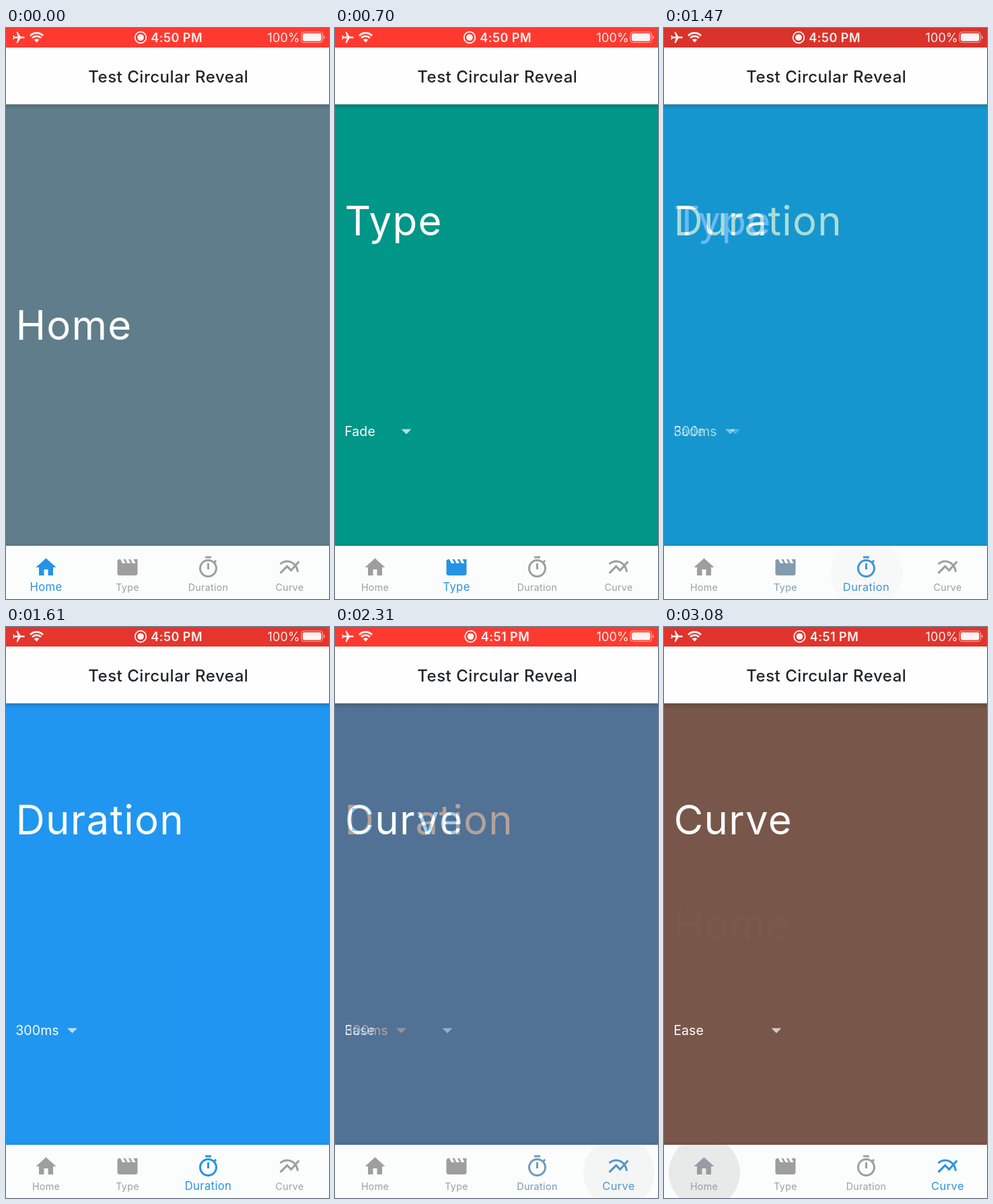
An HTML page for the animation above (3.15 s loop, 480 px wide and 848 px high).

```html
<!DOCTYPE html>
<html lang="en">
<head>
<meta charset="utf-8">
<title>Circular Reveal</title>
<style>
  html, body { margin: 0; width: 100%; height: 100%; overflow: hidden; }
  svg { display: block; width: 100vw; height: 100vh; }
  text { font-family: Inter, Roboto, sans-serif; white-space: pre; }
  .status { font-size: 18px; fill: #fff4f2; }
  .title { font-size: 24px; font-weight: 500; letter-spacing: .52px; fill: #212326; text-anchor: middle; }
  .big { font-size: 60px; letter-spacing: 1.25px; fill: #fff; }
  .value { font-size: 19.5px; letter-spacing: .1px; fill: #fff; }
  .label { font-size: 16.6px; letter-spacing: .38px; text-anchor: middle; }
</style>
</head>
<body>
<svg viewBox="0 0 480 848">
  <defs>
    <linearGradient id="down" x2="0" y2="1">
      <stop stop-opacity=".28"/><stop offset=".4" stop-opacity=".1"/><stop offset="1" stop-opacity="0"/>
    </linearGradient>
    <linearGradient id="up" y1="1" x2="0" y2="0">
      <stop stop-opacity=".06"/><stop offset="1" stop-opacity="0"/>
    </linearGradient>
    <clipPath id="barClip"><path d="M0 769H480V848H0z"/></clipPath>
  </defs>

  <g id="pages"></g>

  <rect y="113" width="480" height="8" fill="url(#down)"/>
  <rect y="28" width="480" height="85.4" fill="#fefefe"/>
  <text class="title" x="241.3" y="80.5">Test Circular Reveal</text>

  <rect id="status" width="480" height="29"/>
  <g fill="#fff4f2">
    <path transform="translate(19 14) rotate(90) scale(.88) translate(-11.5 -12)"
      d="M21 16v-2l-8-5V3.5c0-.83-.67-1.5-1.5-1.5S10 2.67 10 3.5V9l-8 5v2l8-2.5V19l-2 1.5V22l3.5-1 3.5 1v-1.5L13 19v-5.5l8 2.5z"/>
    <path d="M45.5 21.5l-3.8-3.9a5.4 5.4 0 0 1 7.6 0z"/>
    <path d="M39.1 14.8a9 9 0 0 1 12.8 0M36 11.4a13.4 13.4 0 0 1 19 0" fill="none" stroke="#fff4f2" stroke-width="2.8"/>
    <g id="record">
      <circle cx="200" cy="14" r="8.3" fill="none" stroke="#fff4f2" stroke-width="1.8"/>
      <circle cx="200" cy="14" r="4.8"/>
      <text id="clock" class="status" x="215.2" y="20.5" font-weight="600" letter-spacing=".5"></text>
    </g>
    <text class="status" x="388.5" y="20.5" letter-spacing=".15">100%</text>
    <rect x="439" y="6" width="31.5" height="15.5" rx="4" fill="none" stroke="#fff4f2" stroke-opacity=".6" stroke-width="1.2"/>
    <rect x="441" y="8" width="27.5" height="11.5" rx="2.4"/>
    <path d="M472 11.2q2 .6 2 2.6t-2 2.6z" opacity=".6"/>
  </g>

  <rect y="764" width="480" height="5" fill="url(#up)"/>
  <rect y="769" width="480" height="79" fill="#fbfcfc"/>
  <g id="bar" clip-path="url(#barClip)"><circle id="ripple" cy="810"/></g>
</svg>

<script>
const LOOP = 3150, STEP = 70, FADE = 300;
const $ = id => document.getElementById(id);

const tabs = [
  { name: 'Home', x: 59.5, color: '#607d8b', y: 463,
    icon: 'M10 20v-6h4v6h5v-8h3L12 3 2 12h3v8z' },
  { name: 'Type', x: 180.5, color: '#009688', y: 307.5, value: 'Fade', arrow: 106,
    icon: 'M18 4l2 4h-3l-2-4h-2l2 4h-3l-2-4H8l2 4H7L5 4H4c-1.1 0-2 .9-2 2v12c0 1.1.9 2 2 2h16c1.1 0 2-.9 2-2V4h-4z' },
  { name: 'Duration', x: 300.5, color: '#2196f3', y: 307.5, value: '300ms', arrow: 98.5,
    icon: 'M15 1H9v2h6V1zm-4 13h2V8h-2v6zm8.03-6.61l1.42-1.42c-.43-.51-.9-.99-1.41-1.41l-1.42 1.42C16.07 4.74 14.12 4 12 4c-4.97 0-9 4.03-9 9s4.02 9 9 9 9-4.03 9-9c0-2.12-.74-4.07-1.97-5.61zM12 20c-3.87 0-7-3.13-7-7s3.13-7 7-7 7 3.13 7 7-3.13 7-7 7z' },
  { name: 'Curve', x: 421.5, color: '#795548', y: 307.5, value: 'Ease', arrow: 167,
    icon: 'M22 6.92l-1.41-1.41-2.85 3.21C15.68 6.4 12.83 5 9.61 5 6.72 5 4.07 6.16 2 8l1.42 1.42C5.12 7.93 7.27 7 9.61 7c2.74 0 5.09 1.26 6.77 3.24l-2.88 3.24-4-4L2 16.99l1.5 1.5 6-6.01 4 4 4.05-4.55c.75 1.35 1.25 2.9 1.44 4.55H21c-.22-2.3-.95-4.39-2.04-6.14L22 6.92z' }
];

// press: finger down, at: tab switches
const taps = [
  { tab: 1, press: 380, at: 390 },
  { tab: 2, press: 1335, at: 1353 },
  { tab: 3, press: 2205, at: 2215 },
  { tab: 0, press: 2960, at: 3068 }
];

function group(parent, markup) {
  const g = document.createElementNS('http://www.w3.org/2000/svg', 'g');
  g.innerHTML = markup;
  return parent.appendChild(g);
}

for (const tab of tabs) {
  const picker = tab.value ? `<text class="value" x="14.2" y="606">${tab.value}</text>
    <path d="M${tab.arrow - 7.5} 595.8h15l-7.5 7.4z" fill="#fff" opacity=".7"/>` : '';
  tab.page = group($('pages'), `<rect y="28" width="480" height="745" fill="${tab.color}"/>
    <text class="big" x="14.4" y="${tab.y}">${tab.name}</text>${picker}`);
  tab.item = group($('bar'), `<path fill-rule="evenodd" d="${tab.icon}"
    transform="translate(${tab.x} 801) scale(1.5) translate(-12 -12)"/>
    <text class="label">${tab.name}</text>`);
  tab.label = tab.item.querySelector('text');
}

const clamp = v => Math.min(1, Math.max(0, v));
const mix = (a, b, p) => a + (b - a) * p;
const blend = (a, b, p) => `rgb(${a.map((v, i) => Math.round(mix(v, b[i], p)))})`;

function bezier(x1, y1, x2, y2) {
  const at = (a, b, u) => 3 * a * u * (1 - u) ** 2 + 3 * b * u * u * (1 - u) + u ** 3;
  return x => {
    if (x <= 0 || x >= 1) return clamp(x);
    let lo = 0, hi = 1;
    for (let i = 0; i < 24; i++) {
      const mid = (lo + hi) / 2;
      if (at(x1, x2, mid) < x) lo = mid; else hi = mid;
    }
    return at(y1, y2, lo);
  };
}
const ease = bezier(.25, .1, .25, 1);
const fastOutSlowIn = bezier(.4, 0, .2, 1);

function drawPages(from, to, age) {
  const top = tabs[to].page;
  if ($('pages').lastElementChild !== top) $('pages').append(top);
  tabs.forEach((tab, i) => {
    const alpha = i === to ? ease(clamp(age / FADE)) : i === from ? 1 : 0;
    tab.page.setAttribute('opacity', alpha);
  });
}

function drawBar(from, to, age) {
  const p = clamp(age / 150);
  tabs.forEach((tab, i) => {
    const on = v => i === to ? v : i === from ? 1 - v : 0;
    const grow = on(fastOutSlowIn(p));
    tab.item.setAttribute('fill', blend([158, 158, 158], [36, 147, 228], on(p)));
    tab.label.setAttribute('transform',
      `translate(${tab.x} ${mix(836.3, 835.6, grow)}) scale(${mix(12 / 14, 1, grow)})`);
  });
}

function drawRipple(t) {
  const tap = taps.findLast(a => t >= a.press);
  const ripple = $('ripple');
  ripple.setAttribute('opacity', tap ? .08 * (1 - clamp((t - tap.at) / 150)) : 0);
  if (!tap) return;
  ripple.setAttribute('cx', tabs[tap.tab].x + .5);
  ripple.setAttribute('r', 53 * ease(clamp((t - tap.press) / 100)));
}

function drawStatus(t) {
  const period = 1850;
  const phase = (t - 1400 + 1.5 * period) % period - period / 2;
  const glow = clamp((Math.abs(phase) - 100) / 350);
  $('status').setAttribute('fill', blend([217, 51, 44], [254, 58, 48], glow));
  const late = t >= 2200;
  $('clock').textContent = late ? '4:51 PM' : '4:50 PM';
  $('record').setAttribute('transform', `translate(${late ? 1.5 : 0})`);
}

function frame() {
  const t = Math.floor(performance.now() / STEP) * STEP % LOOP;
  const n = taps.findLastIndex(a => t >= a.at);
  const to = n < 0 ? 0 : taps[n].tab;
  const from = n < 1 ? 0 : taps[n - 1].tab;
  const age = n < 0 ? LOOP : t - taps[n].at;
  drawPages(from, to, age);
  drawBar(from, to, age);
  drawRipple(t);
  drawStatus(t);
  requestAnimationFrame(frame);
}
frame();
</script>
</body>
</html>
```
